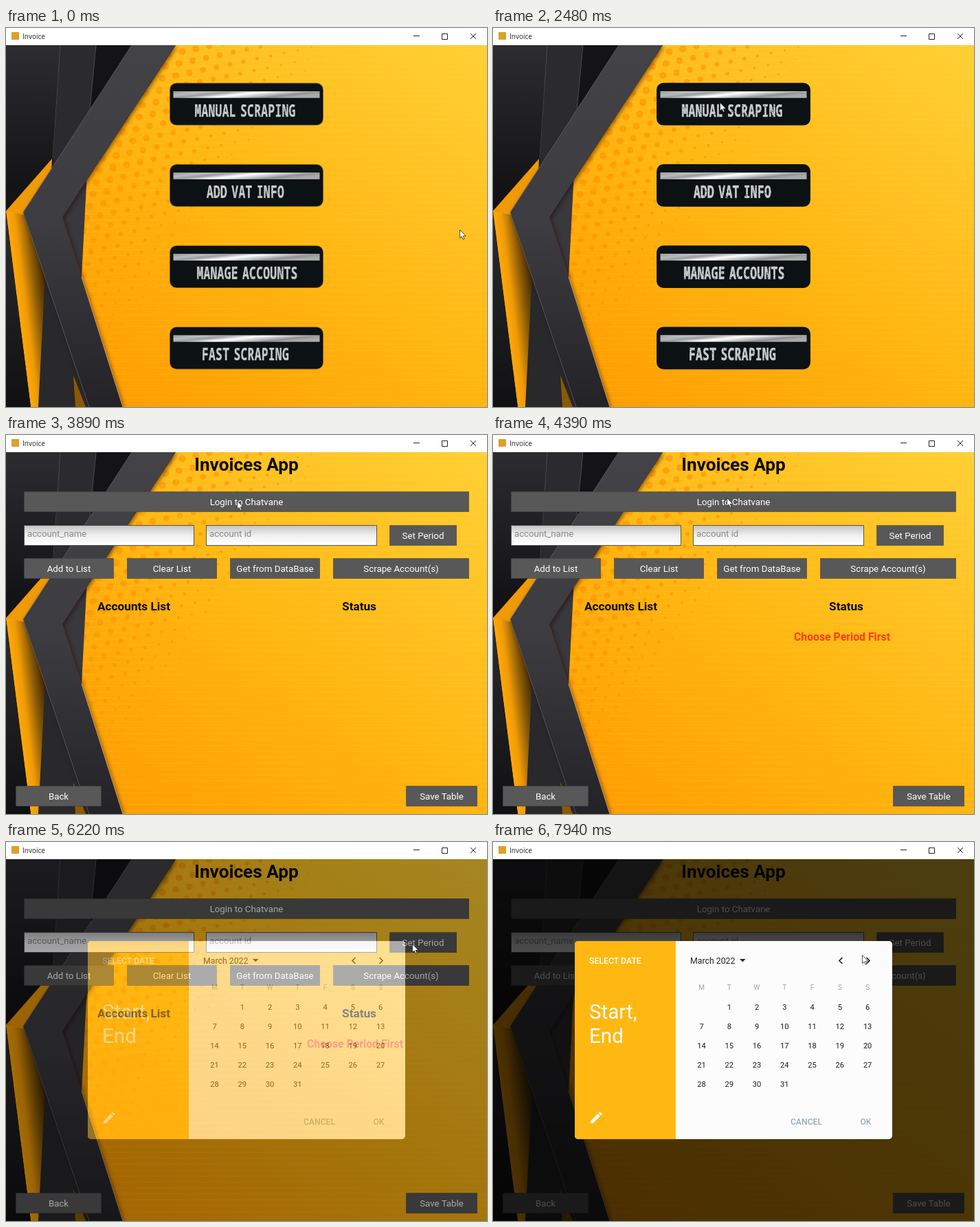
Animation of 700x551 px, one loop 8000 ms. Source, as an HTML page:

```html
<!DOCTYPE html>
<html lang="en">
<head>
<meta charset="utf-8">
<title>Invoice</title>
<style>
html, body { margin: 0; width: 100%; height: 100%; overflow: hidden; background: #fff }
svg { display: block; width: 700px; height: 551px; font-family: Roboto, sans-serif }
.label { font: 700 25px "Noto Sans Mono", "DejaVu Sans Mono", monospace; letter-spacing: .5px; word-spacing: -6px }
.band { filter: drop-shadow(2px 2px 3px #2008) }
</style>
</head>
<body>
<svg viewBox="0 0 700 551">
  <defs>
    <linearGradient id="sun" x1="0" y1="1" x2="1" y2="0">
      <stop offset=".1" stop-color="#ff9c00"/><stop offset=".5" stop-color="#ffb510"/><stop offset="1" stop-color="#ffd034"/>
    </linearGradient>
    <linearGradient id="coal" x1="0" y1="0" x2="0" y2="1">
      <stop stop-color="#2c2c31"/><stop offset="1" stop-color="#101012"/>
    </linearGradient>
    <linearGradient id="slate" x1="0" y1="0" x2="0" y2="1">
      <stop stop-color="#434246"/><stop offset=".5" stop-color="#3d3c41"/><stop offset="1" stop-color="#232226"/>
    </linearGradient>
    <linearGradient id="amber" gradientUnits="userSpaceOnUse" x1="0" y1="268" x2="48" y2="262">
      <stop stop-color="#ffa90a"/><stop offset=".25" stop-color="#f09a06"/><stop offset=".6" stop-color="#8a5a06"/><stop offset="1" stop-color="#2a1c06"/>
    </linearGradient>
    <linearGradient id="steel" x2="1" y2=".4">
      <stop stop-color="#8c8f90"/><stop offset=".2" stop-color="#b9bbbc"/><stop offset=".36" stop-color="#9b9d9e"/>
      <stop offset=".55" stop-color="#fff"/><stop offset=".72" stop-color="#c4c6c7"/><stop offset=".86" stop-color="#8f9192"/><stop offset="1" stop-color="#aaa"/>
    </linearGradient>
    <linearGradient id="field" x1="0" y1="0" x2="0" y2="1">
      <stop stop-color="#c4c4c4"/><stop offset=".5" stop-color="#f0f0f0"/><stop offset="1" stop-color="#fff"/>
    </linearGradient>
    <pattern id="lines" width="700" height="8.6" patternUnits="userSpaceOnUse">
      <path d="M0 4H700" stroke="#ffdf68" stroke-opacity=".18"/>
    </pattern>
  </defs>

  <rect y="25" width="700" height="526" fill="url(#sun)"/>
  <g id="dots" fill="#ff9200" fill-opacity=".62"></g>
  <rect y="25" width="700" height="526" fill="url(#lines)"/>

  <path d="M0 25H247L82 275 170 551H0Z" fill="#141416"/>
  <path d="M0 25H79L67 190 0 264Z" fill="url(#coal)"/>
  <path d="M79 25H131L122 121 68 205Z" fill="#2b2b2f"/>
  <path d="M79 25 68 190M131 25 122 118" stroke="#5b5b60" stroke-opacity=".7"/>
  <path d="M0 266 36 551H47L80 400 28 262Z" fill="url(#amber)"/>
  <path d="M67 190 0 266 28 272 66 215Z" fill="#f09a06"/>
  <path d="M58 340 47 551H122L60 340Z" fill="#29282b"/>
  <path d="M98 505 101 551H116Z" fill="#8a5a06"/>
  <path d="M0 270 36 551H0Z" fill="url(#coal)"/>
  <path d="M118 210 110 362 82 275Z" fill="#39383c"/>
  <path class="band" d="M183 25H247L82 275 170 551H121L25 268Z" fill="url(#slate)"/>
  <path d="M183 25 25 268 121 551" fill="none" stroke="#69686d" stroke-opacity=".7"/>
  <path d="M110 362 170 551" stroke="#b5a17c"/>

  <g id="menu"></g>
  <g id="app" fill="#fff"></g>
  <g id="picker"></g>

  <rect width="700" height="25" fill="#fff"/>
  <rect x="8" y="6" width="11" height="11" fill="#dda02a"/>
  <text x="24" y="15.5" font-size="10" style="font-family:'Open Sans',sans-serif" fill="#222">Invoice</text>
  <path d="M593 11.5H602M634.5 8.500H642.500V16.500H634.500ZM676 8 684 16M684 8 676 16" fill="none" stroke="#222"/>
  <path id="cursor" d="M.5 .5V12.500L3.200 10 5.200 14.300 7 13.500 5.200 9.300H9Z" fill="#fff" stroke="#222" stroke-width=".8"/>
</svg>
<script>
const $ = id => document.getElementById(id);
let seed = 7;
const rand = () => (seed = seed * 16807 % 2147483647) / 2147483647;

const text = (x, y, size, s, fill = '#fff', weight = 400, anchor = 'middle') =>
  `<text x="${x}" y="${y}" font-size="${size}" fill="${fill}" font-weight="${weight}" text-anchor="${anchor}">${s}</text>`;
const rect = (x, y, w, h, fill, more = '') =>
  `<rect x="${x}" y="${y}" width="${w}" height="${h}" fill="${fill}" ${more}/>`;

// Halftone: a tilted grid whose dots shrink away from the dark band
function halftone() {
  let out = '';
  const a = .26, step = 18;
  for (let i = -10; i < 40; i++) for (let j = -20; j < 40; j++) {
    const u = i * step, v = (j + (i & 1) / 2) * step;
    const x = u * Math.cos(a) - v * Math.sin(a) + 108, y = u * Math.sin(a) + v * Math.cos(a) + 32;
    const r = Math.min(5.2, (510 - x - .65 * y) / 43);
    if (r > .5 && x > 100 && y > 20 && y < 480)
      out += `<circle cx="${x.toFixed(1)}" cy="${y.toFixed(1)}" r="${r.toFixed(1)}"/>`;
  }
  return out;
}

function plate(label, i, cx) {
  const y = 80.7 + 118.2 * i;
  let specks = '';
  for (let k = 0; k < 70; k++)
    specks += `M${(cx - 76 + rand() * 152).toFixed(1)} ${(y + 29 + rand() * 20).toFixed(1)}l${(rand() * 2).toFixed(1)} 1`;
  return rect(239, y, 222, 60, '#0c1114', 'rx="9" stroke="#0c1114" stroke-width="1.8"') +
    rect(243.5, y + 11.5, 213, 9.5, 'url(#steel)') +
    `<path d="M243.5 ${y + 11.8}H456.500" stroke="#eee" stroke-width=".7"/>` +
    `<text class="label" transform="translate(${cx} ${y + 48}) scale(.65 1)" text-anchor="middle" fill="#c8cbcc" stroke="#c8cbcc" stroke-width=".7">${label}</text>` +
    `<path d="${specks}" stroke="#0c1114" stroke-width=".9"/>`;
}

const button = (x, y, w, label, id = '') =>
  rect(x + .5, y + .5, w - 1, 29, '#585858', `id="${id}" stroke="#444" stroke-opacity=".6"`) +
  text(x + w / 2, y + 20, 13.3, label);
const input = (x, w, hint) =>
  rect(x + .5, 131.5, w - 1, 29, 'url(#field)', 'stroke="#555"') +
  text(x + 5, 148.3, 13.2, hint, '#888', 400, 'start');

function calendar() {
  const col = c => 303.5 + 40.27 * c;
  let out = [...'MTWTFSS'].map((d, c) => text(col(c), 214.5, 10, d, '#a5a5a5')).join('');
  for (let d = 1; d <= 31; d++)
    out += text(col(d % 7), 243.7 + 28 * Math.floor(d / 7), 11.1, d, '#1c1c1c');
  return out;
}

$('dots').innerHTML = halftone();
$('menu').innerHTML = plate('MANUAL SCRAPING', 0, 348) + plate('ADD VAT INFO', 1, 348.5) +
  plate('MANAGE ACCOUNTS', 2, 351) + plate('FAST SCRAPING', 3, 348.5);
$('app').innerHTML =
  text(350, 51.5, 26.2, 'Invoices App', '#0a0a0a', 700) +
  button(26, 82, 648, 'Login to Chatvane', 'login') +
  input(26, 248, 'account_name') + input(291, 249, 'account id') +
  button(558, 131, 98, 'Set Period', 'period') +
  button(26, 179, 131, 'Add to List') + button(176, 179, 131, 'Clear List') +
  button(326, 179, 131, 'Get from DataBase') + button(476, 179, 198, 'Scrape Account(s)') +
  text(186, 255, 17.2, 'Accounts List', '#0a0a0a', 700) + text(514, 255, 17.2, 'Status', '#0a0a0a', 700) +
  `<g id="warning">${text(508, 298.5, 15.8, 'Choose Period First', '#ff3c14', 700)}</g>` +
  button(14, 510, 125, 'Back') + button(582, 510, 104, 'Save Table');
$('picker').innerHTML =
  rect(0, 25, 700, 526, '#000', 'fill-opacity=".7"') +
  rect(119, 144, 462, 288, '#fcfcfc', 'rx="5"') +
  '<path d="M266 144H124a5 5 0 0 0-5 5V427a5 5 0 0 0 5 5H266Z" fill="#ffb812"/>' +
  text(140, 177, 12.3, 'SELECT DATE', '#fff', 500, 'start') +
  text(140, 256.5, 29.6, 'Start,', '#fff', 400, 'start') + text(140, 291.5, 29.6, 'End', '#fff', 400, 'start') +
  '<path d="M142 409V405.500L152.500 395 156 398.500 145.500 409ZM153.500 394 155 392.700Q155.700 392.300 156.400 392.900L158.200 394.700Q158.700 395.400 158.200 396.100L157 397.500Z" fill="#fff"/>' +
  text(287, 177, 12.3, 'March 2022', '#222', 400, 'start') +
  '<path d="M359 170H367.500L363.250 174.300Z" fill="#222"/>' +
  '<path d="M508.500 168 504 172.500 508.500 177M543.500 168 548 172.500 543.500 177" fill="none" stroke="#222" stroke-width="1.7"/>' +
  calendar() + text(456, 411, 12.2, 'CANCEL', '#9aabb7', 500) + text(542.5, 411, 12.2, 'OK', '#9aabb7', 500);

// Pointer moves: first step, last step, step count, then the cubic curve
const moves = [
  [160, 260, 2, 660, 293, 660, 294, 660, 295, 660, 295],
  [460, 1260, 9, 660, 295, 685, 200, 655, 128, 458, 112],
  [1360, 1760, 5, 458, 112, 445, 160, 365, 165, 330, 108],
  [3590, 4090, 6, 330, 108, 330, 102, 337, 94, 340, 91],
  [4910, 5700, 9, 340, 91, 290, 128, 420, 156, 591, 148],
  [6720, 7420, 8, 591, 148, 570, 225, 415, 265, 343, 242],
  [7550, 7940, 5, 343, 242, 400, 238, 490, 195, 537, 164]
];

function pointer(t) {
  let pos = [660, 293];
  for (const [from, to, n, ...p] of moves) {
    if (t < from) break;
    const step = Math.floor((t - from) / (to - from) * (n - 1) + 1e-6) + 1;
    const u = Math.min(1, step / n), v = 1 - u;
    pos = [0, 1].map(k => v ** 3 * p[k] + 3 * v * v * u * p[k + 2] + 3 * v * u * u * p[k + 4] + u ** 3 * p[k + 6]);
  }
  return pos;
}

// Two-stage appearance: hidden, halfway, shown
const fade = (t, half, full) => t < half ? 0 : t < full ? .5 : 1;
const press = (id, on) => $(id).setAttribute('fill', on ? '#32a4ce' : '#585858');

function draw(now) {
  const t = now % 8000, app = fade(t, 2580, 2680);
  $('menu').style.opacity = 1 - app;
  $('menu').style.strokeOpacity = t >= 2390 ? 1 : .6;
  $('app').style.opacity = app;
  $('picker').style.opacity = fade(t, 6220, 6320);
  $('warning').style.opacity = t >= 4390 ? 1 : 0;
  press('login', t >= 4290 && t < 4390);
  press('period', t >= 5810 && t < 6220);
  $('cursor').setAttribute('transform', `translate(${pointer(t)})`);
  requestAnimationFrame(draw);
}
requestAnimationFrame(draw);
</script>
</body>
</html>
```
